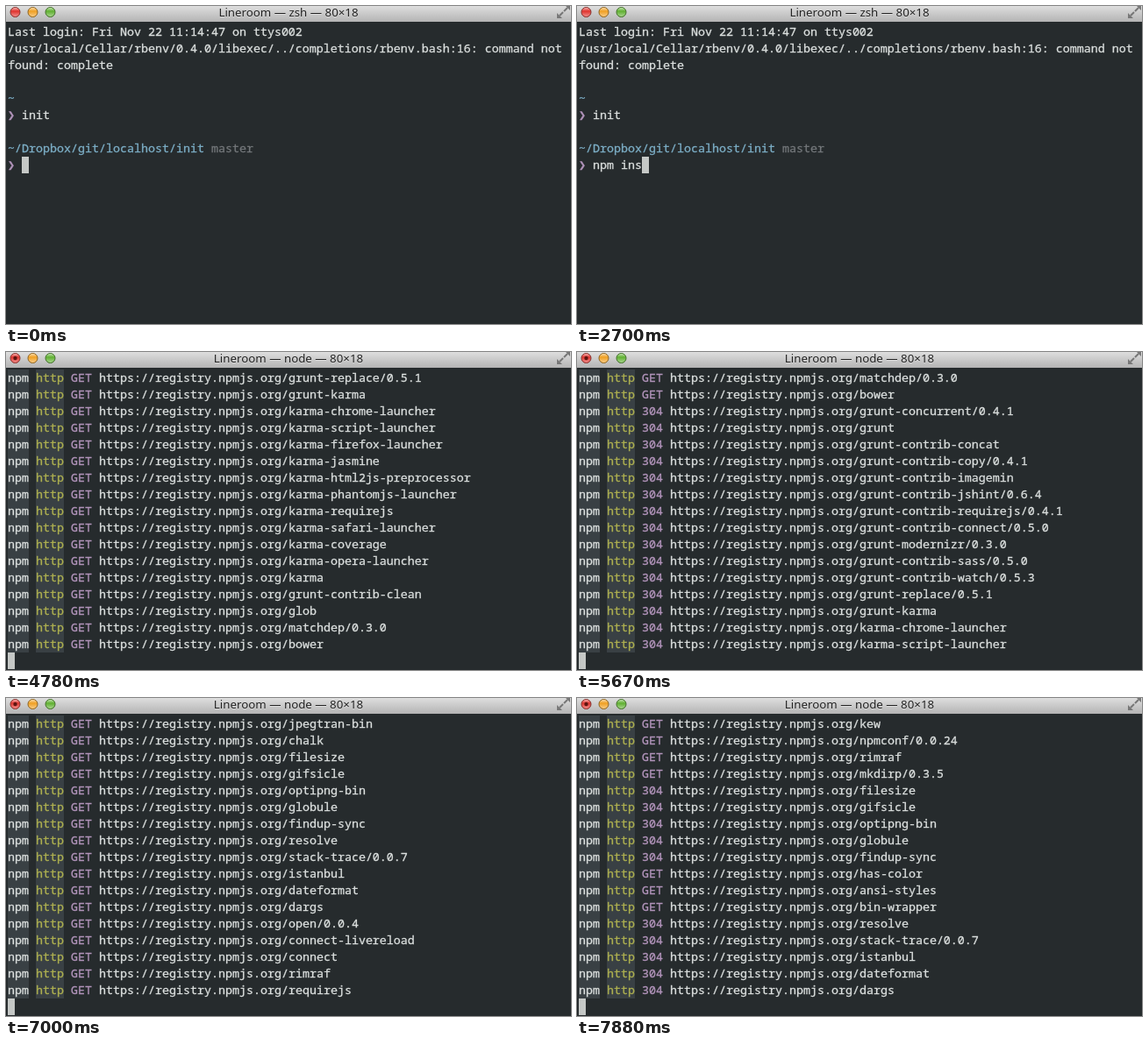
An HTML page that plays this animation: 644 by 363 pixels, repeating every 8 s.

```html
<!DOCTYPE html>
<html lang="en">
<head>
<meta charset="utf-8">
<title>Package install</title>
<style>
html, body { margin: 0; width: 100%; height: 100%; overflow: hidden; background: #262b2d; }
#stage { position: absolute; left: 0; top: 0; width: 644px; height: 363px; overflow: hidden; }
#bar {
  position: absolute; left: 0; top: 0; width: 644px; height: 18px;
  background: linear-gradient(#dedede, #b4b4b4);
}
#bar svg { position: absolute; left: 0; top: 0; }
#title {
  position: absolute; left: 0; top: -3px; width: 644px; line-height: 20px; text-align: center;
  font-family: "Noto Sans", "Open Sans", sans-serif; font-size: 13.3px; color: #222;
  text-shadow: 0 1px rgba(255, 255, 255, .4); white-space: pre;
}
#screen {
  position: absolute; left: 2px; top: 20px; color: #dce0df; white-space: pre;
  font: 500 13.333px/19px "Noto Sans Mono", monospace; font-variant-ligatures: none;
  -webkit-text-stroke: .3px currentColor;
}
.row { height: 19px; }
.row i { font-style: normal; }
.npm, .http, .cursor, .prompt { display: inline-block; height: 19px; vertical-align: top; }
.npm, .http { background: #394044; }
.http { color: #aeb050; }
.status, .prompt { color: #b294bb; }
.prompt { width: 8px; font-family: "DejaVu Sans Mono", monospace; font-weight: bold; }
.path { color: #7caec6; }
.branch { color: #73777a; }
.cursor { width: 8px; background: #c5c8c6; }
</style>
</head>
<body>
<div id="stage">
  <div id="bar">
    <svg width="644" height="18">
      <defs>
        <linearGradient id="gloss" x2="0" y2="1">
          <stop offset="0" stop-color="#fff" stop-opacity=".6"/>
          <stop offset=".4" stop-color="#fff" stop-opacity="0"/>
          <stop offset="1" stop-color="#fff" stop-opacity=".45"/>
        </linearGradient>
      </defs>
      <g stroke-width="1">
        <circle cx="10.5" cy="7" r="5.5" fill="#e0332d" stroke="#85332f"/>
        <circle cx="30.5" cy="7" r="5.5" fill="#f0a022" stroke="#8a6426"/>
        <circle cx="50.5" cy="7" r="5.5" fill="#5fb030" stroke="#446f2d"/>
      </g>
      <g fill="url(#gloss)">
        <circle cx="10.5" cy="7" r="5"/>
        <circle cx="30.5" cy="7" r="5"/>
        <circle cx="50.5" cy="7" r="5"/>
      </g>
      <circle id="busy" cx="10.5" cy="7" r="2.2" fill="#5e1511"/>
      <g fill="#777" stroke="#777" stroke-width="2">
        <path d="M636 6L640 2M635 7L631 11" fill="none"/>
        <path d="M637 -1H643V5ZM628 8V14H634Z" stroke="none"/>
      </g>
    </svg>
    <div id="title"></div>
  </div>
  <div id="screen"></div>
</div>
<script>
const LOOP = 8000, ROWS = 18, RUN_AT = 3590;
const COMMAND = 'npm install';

const span = (kind, text = '') => `<i class="${kind}">${text}</i>`;
const prompt = text => span('prompt', '❯') + ' ' + text;

const intro = [
  'Last login: Fri Nov 22 11:14:47 on ttys002',
  '/usr/local/Cellar/rbenv/0.4.0/libexec/../completions/rbenv.bash:16: command not',
  'found: complete',
  '',
  span('path', '~'),
  prompt('init'),
  '',
  span('path', '~/Dropbox/git/localhost/init') + ' ' + span('branch', 'master'),
];

const requests = (status, names) => names.trim().split(/\s+/).map(name =>
  `${span('npm', 'npm')} ${span('http', 'http')} ${span('status', status)} https://registry.npmjs.org/${name}`);

const karma = `grunt-replace/0.5.1 grunt-karma karma-chrome-launcher karma-script-launcher
  karma-firefox-launcher karma-jasmine karma-html2js-preprocessor karma-phantomjs-launcher
  karma-requirejs karma-safari-launcher karma-coverage karma-opera-launcher karma
  grunt-contrib-clean glob matchdep/0.3.0 bower`;

const log = [
  ...requests('GET', `grunt grunt-contrib-copy/0.4.1 grunt-contrib-concat grunt-concurrent/0.4.1
    grunt-contrib-imagemin grunt-contrib-jshint/0.6.4 grunt-contrib-requirejs/0.4.1
    grunt-contrib-connect/0.5.0 grunt-contrib-sass/0.5.0 grunt-contrib-watch/0.5.3
    grunt-modernizr/0.3.0 ${karma}`),
  ...requests('304', `grunt-concurrent/0.4.1 grunt grunt-contrib-concat grunt-contrib-copy/0.4.1
    grunt-contrib-imagemin grunt-contrib-jshint/0.6.4 grunt-contrib-requirejs/0.4.1
    grunt-contrib-connect/0.5.0 grunt-modernizr/0.3.0 grunt-contrib-sass/0.5.0
    grunt-contrib-watch/0.5.3 ${karma}`),
  ...requests('GET', `async lodash hooker iconv-lite minimatch js-yaml exit getobject nopt which
    underscore.string coffee-script eventemitter2 colors graceful-fs esprima inherits semver
    jpegtran-bin chalk filesize gifsicle optipng-bin globule findup-sync resolve
    stack-trace/0.0.7 istanbul dateformat dargs open/0.0.4 connect-livereload connect
    rimraf requirejs source-map tiny-lr noptify gaze useragent log4js optimist chokidar
    http-proxy socket.io`),
  ...requests('304', 'async lodash jpegtran-bin chalk'),
  ...requests('GET', 'kew npmconf/0.0.24 rimraf mkdirp/0.3.5'),
  ...requests('304', 'filesize gifsicle optipng-bin globule findup-sync'),
  ...requests('GET', 'has-color ansi-styles bin-wrapper'),
  ...requests('304', 'resolve stack-trace/0.0.7 istanbul dateformat dargs'),
];

// [time in ms, value from then on]
const typed = [[1200, 1], [1500, 2], [1650, 3], [2400, 4], [2550, 6], [2700, 7],
  [3000, 8], [3150, 10], [3300, 11]];
const logged = [[4340, 9], [4480, 15], [4630, 22], [4780, 28],
  [5380, 31], [5530, 37], [5670, 43], [5820, 47], [5970, 52], [6110, 56],
  [6560, 64], [6700, 73], [6850, 82], [7000, 91], [7140, 94], [7290, 98],
  [7430, 102], [7580, 107], [7730, 115], [7880, 122]];

const valueAt = (steps, t) => steps.reduce((value, [time, next]) => t >= time ? next : value, 0);

const screenEl = document.getElementById('screen');
const titleEl = document.getElementById('title');
const busyEl = document.getElementById('busy');
let shown = '';

function render(t) {
  const running = t >= RUN_AT;
  const lines = [...intro, prompt(COMMAND.slice(0, valueAt(typed, t)))];
  if (running) lines.push(...log.slice(0, valueAt(logged, t)), '');
  lines[lines.length - 1] += span('cursor');

  const html = lines.slice(-ROWS).map(line => `<div class="row">${line}</div>`).join('');
  if (html === shown) return;
  shown = html;
  screenEl.innerHTML = html;
  titleEl.textContent = `Lineroom — ${running ? 'node' : 'zsh'} — 80×18`;
  busyEl.style.display = running ? '' : 'none';
}

let start;
function tick(now) {
  start ??= now;
  render((now - start) % LOOP);
  requestAnimationFrame(tick);
}
render(0);
requestAnimationFrame(tick);
</script>
</body>
</html>
```
